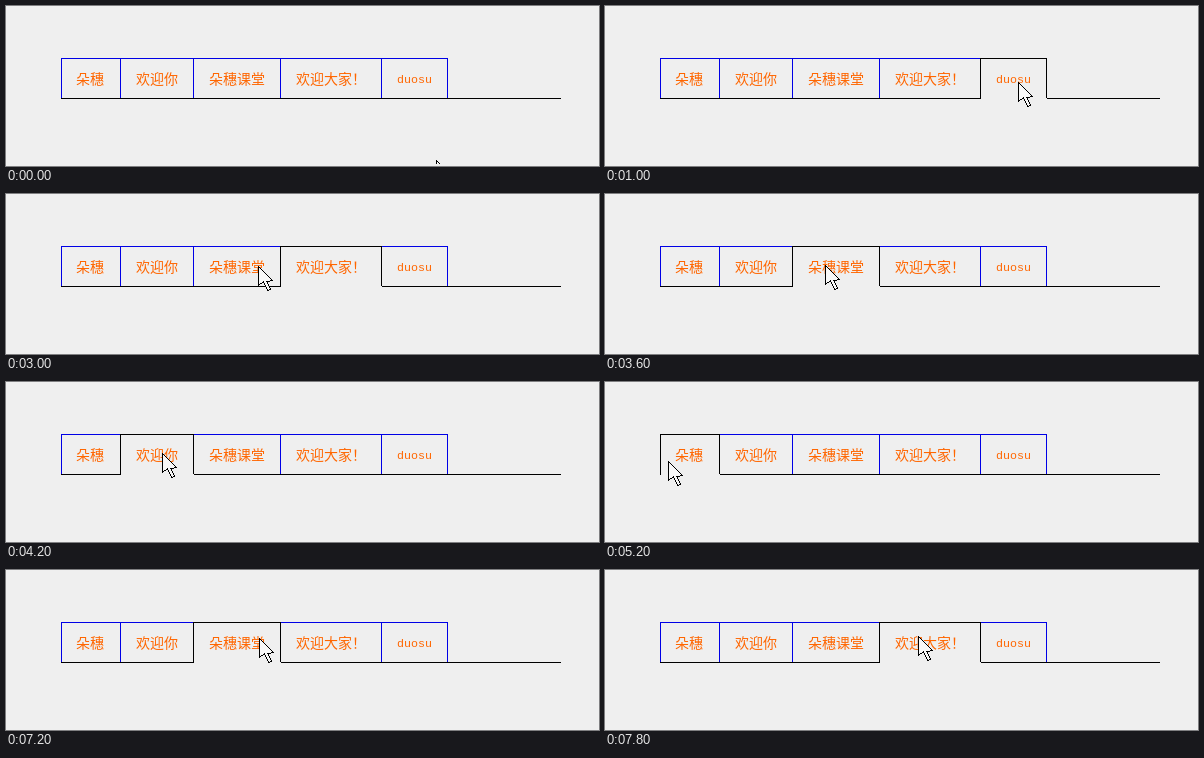
These frames come from a looping animation (593x160 px, 8000 ms). An HTML page with a canvas:

```html
<!DOCTYPE html>
<html lang="zh">
<head>
<meta charset="utf-8">
<title>Tabs</title>
<style>
html, body { margin: 0; width: 100%; height: 100%; overflow: hidden; background: #efefef; }
canvas { display: block; }
</style>
</head>
<body>
<canvas id="stage" width="593" height="160"></canvas>
<script>
const ctx = document.getElementById('stage').getContext('2d');
const LOOP = 8000, STEP = 200;
const LEFT = 55, RIGHT = 555, TOP = 52, BASE = 92, PAD = 15, SIZE = 14;
const BLACK = '#000', BLUE = '#0000e6', ORANGE = '#f60', BG = '#efefef';

const isLatin = text => /^[a-z]+$/.test(text);

// Tabs sit side by side, each as wide as its label plus padding and a border
let nextX = LEFT;
const tabs = ['朵穗', '欢迎你', '朵穗课堂', '欢迎大家!', 'duosu'].map(text => {
  const x = nextX;
  const w = text.length * (isLatin(text) ? SIZE / 2 : SIZE) + 2 * PAD + 1;
  nextX += w;
  return { text, x, w };
});

// Pointer moves: from, to, x, y; it rests in between
const start = { x: 430, y: 154 };
const moves = [
  [0, 1200, 412, 73],
  [1400, 2200, 330, 73],
  [2400, 3600, 220, 71],
  [3600, 4600, 141, 71],
  [4800, 5200, 63, 79],
  [5200, 5600, 74, 79],
  [5800, 6400, 120, 75],
  [6400, 7000, 215, 70],
  [7000, 7800, 313, 66]
];

const arrow = [[0, 0], [0, 19], [5, 15], [9, 24], [12, 23], [8, 15], [14, 14]];

function rect(color, x, y, w, h) {
  ctx.fillStyle = color;
  ctx.fillRect(x, y, w, h);
}

function pointerAt(t) {
  let { x, y } = start;
  for (const [from, to, endX, endY] of moves) {
    if (t <= from) break;
    const k = Math.sin(Math.min(1, (t - from) / (to - from)) * Math.PI / 2);
    x += (endX - x) * k;
    y += (endY - y) * k;
  }
  return { x: Math.round(x), y: Math.round(y) };
}

// The highlight follows the pointer one step late
function activeTab(t) {
  const { x, y } = pointerAt(t - STEP);
  return y <= BASE && tabs.find(tab => x >= tab.x && x < tab.x + tab.w);
}

function drawBox({ x, w }, color) {
  rect(color, x, TOP, w + 1, 1);
  rect(color, x, TOP, 1, BASE - TOP);
  rect(color, x + w, TOP, 1, BASE - TOP);
}

function drawTabs(current) {
  rect(BLACK, LEFT, BASE, RIGHT - LEFT, 1);
  tabs.forEach(tab => drawBox(tab, BLUE));
  if (current) {
    drawBox(current, BLACK);
    rect(BG, current.x + 1, BASE, current.w, 1);
  }

  ctx.fillStyle = ORANGE;
  tabs.forEach(({ text, x }, i) => {
    const latin = isLatin(text);
    ctx.font = latin ? '11.67px "Liberation Mono", monospace'
                     : `${SIZE}px "Noto Sans CJK SC", "Noto Sans CJK", sans-serif`;
    ctx.fillText(text.replace('!', '\uff01'), x + PAD + (i ? 1 : 0), latin ? 77 : 78);
  });
}

function pixelLine([x0, y0], [x1, y1]) {
  const n = Math.max(Math.abs(x1 - x0), Math.abs(y1 - y0));
  for (let i = 0; i <= n; i++) {
    rect(BLACK, Math.round(x0 + (x1 - x0) * i / n), Math.round(y0 + (y1 - y0) * i / n), 1, 1);
  }
}

function drawPointer({ x, y }) {
  ctx.save();
  ctx.beginPath();
  ctx.rect(0, 0, 593, 158);
  ctx.clip();
  ctx.translate(x, y);
  ctx.beginPath();
  arrow.forEach(([px, py]) => ctx.lineTo(px + 0.5, py + 0.5));
  ctx.fillStyle = '#f8f8f8';
  ctx.fill();
  arrow.forEach((p, i) => pixelLine(p, arrow[(i + 1) % arrow.length]));
  ctx.restore();
}

function frame() {
  const t = Math.floor(performance.now() % LOOP / STEP) * STEP;
  rect(BG, 0, 0, 593, 160);
  drawTabs(activeTab(t));
  drawPointer(pointerAt(t));
  requestAnimationFrame(frame);
}
frame();
</script>
</body>
</html>
```
